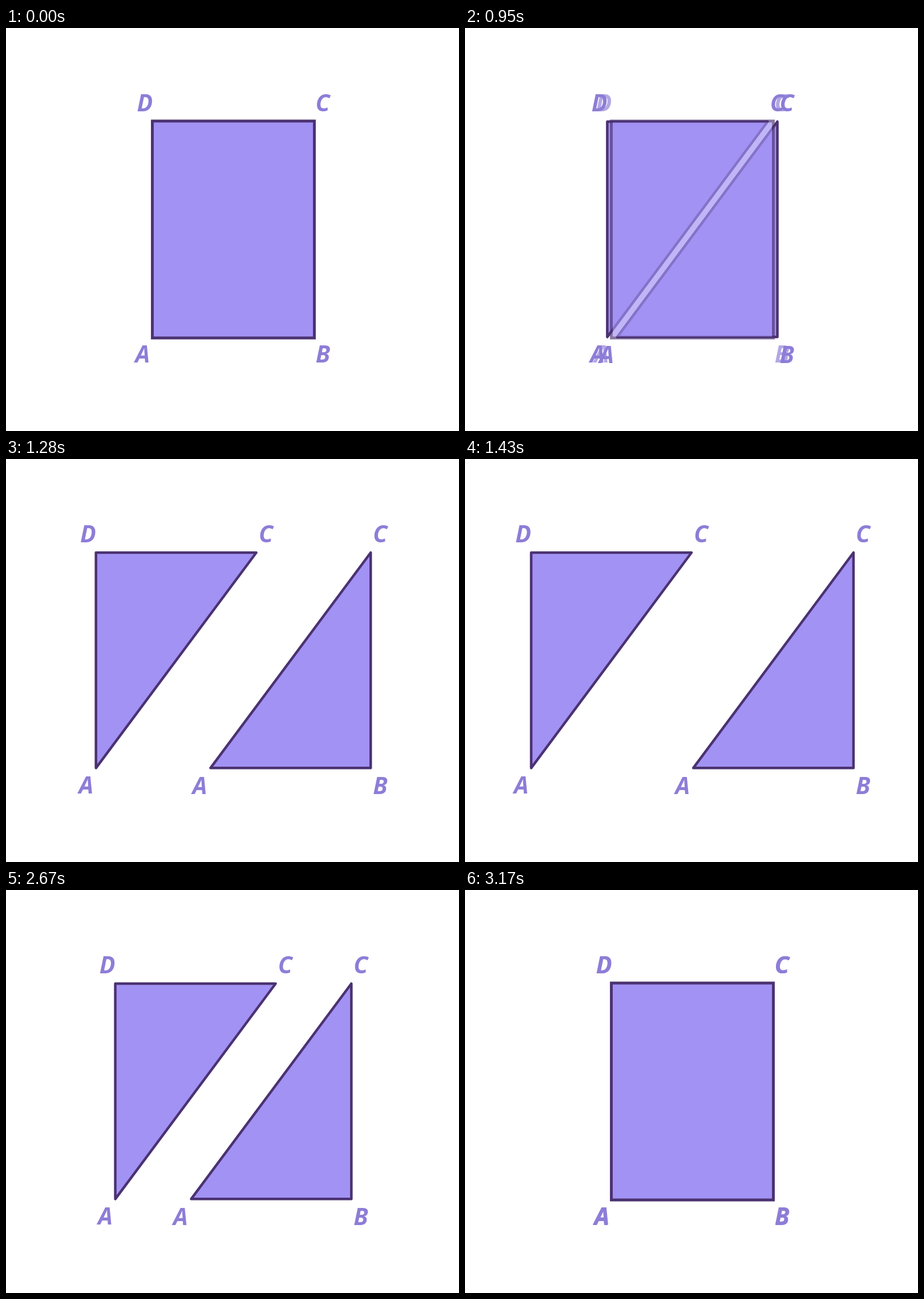
Recreate the animation shown at these times as an HTML page with a canvas. Size 794 by 706 pixels, loop 3.94 s.

```html
<!DOCTYPE html>
<html lang="en">
<head>
<meta charset="utf-8">
<title>Rectangle split along its diagonal</title>
<style>
  html, body { margin: 0; width: 100%; height: 100%; overflow: hidden; background: #fff; }
  canvas { position: absolute; left: 0; top: 0; width: 794px; height: 706px; }
</style>
</head>
<body>
<canvas id="halves"></canvas>
<canvas id="whole"></canvas>
<script>
const W = 794, H = 706, LOOP = 3940, STEP = 30;
const FILL = '#a292f4', LINE = '#4b3271', LABEL = '#8e7dd7';
const TRAVEL = 141.7;

function layer(id) {
  const canvas = document.getElementById(id);
  const scale = window.devicePixelRatio || 1;
  canvas.width = W * scale;
  canvas.height = H * scale;
  const ctx = canvas.getContext('2d');
  ctx.scale(scale, scale);
  ctx.font = 'italic 700 41px "Open Sans", "Noto Sans", sans-serif';
  return ctx;
}

const halves = layer('halves');
const whole = layer('whole');

// Points and labels are given in the closed position.
const rectangle = {
  points: [[256.5, 163], [540.5, 163], [540.5, 543], [256.5, 543]],
  labels: [['D', 243.5, 146], ['C', 557, 146], ['A', 237, 586], ['B', 556.3, 586]],
  width: 4.9, join: 'miter'
};
const left = {
  points: [[257.7, 164], [538.7, 164], [257.7, 541.3]],
  labels: [['D', 244, 146], ['C', 557.5, 146], ['A', 238, 586]],
  width: 4.5, join: 'round'
};
const right = {
  points: [[539.2, 164], [539.2, 541.3], [258.4, 541.3]],
  labels: [['C', 557.7, 146], ['A', 237.3, 587], ['B', 556.7, 587]],
  width: 4.5, join: 'round'
};

// Centres the visible ink of a letter on x.
function letter(ctx, text, x, y) {
  const m = ctx.measureText(text);
  ctx.fillText(text, x + (m.actualBoundingBoxLeft - m.actualBoundingBoxRight) / 2, y);
}

function drawShape(ctx, shape, dx) {
  ctx.save();
  ctx.translate(dx, 0);
  ctx.beginPath();
  shape.points.forEach(([x, y]) => ctx.lineTo(x, y));
  ctx.closePath();
  ctx.fillStyle = FILL;
  ctx.fill();
  ctx.lineWidth = shape.width;
  ctx.lineJoin = shape.join;
  ctx.strokeStyle = LINE;
  ctx.stroke();
  ctx.fillStyle = LABEL;
  shape.labels.forEach(([text, x, y]) => letter(ctx, text, x, y));
  ctx.restore();
}

// Linear progress 0..1 in whole steps; the first step is taken at the start time.
function progress(t, start, steps) {
  const k = Math.floor((t - start) / STEP + 1e-6) + 1;
  return Math.min(Math.max(k, 0), steps) / steps;
}

function render(t) {
  const apart = TRAVEL * (progress(t, 950, 17) - progress(t, 2460, 15));
  halves.clearRect(0, 0, W, H);
  drawShape(halves, left, -apart);
  drawShape(halves, right, apart);
  halves.canvas.style.opacity = progress(t, 300, 7);

  whole.clearRect(0, 0, W, H);
  drawShape(whole, rectangle, 0);
  whole.canvas.style.opacity = 1 - progress(t, 950, 3) + progress(t, 3050, 5);
}

const begin = performance.now();
function tick() {
  render((performance.now() - begin) % LOOP);
  requestAnimationFrame(tick);
}
tick();
</script>
</body>
</html>
```
